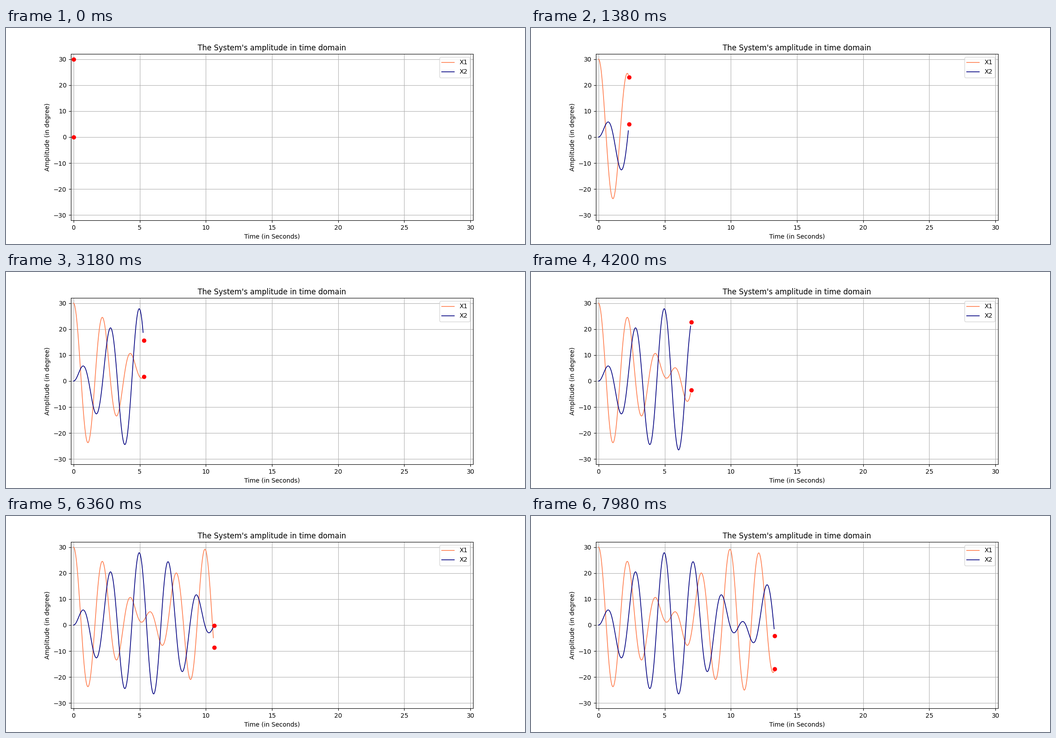
Write a matplotlib script that moves like this. It is 1159 px wide and 483 px high and loops after 8 s.

```python
import numpy as np
import matplotlib.pyplot as plt
from matplotlib.animation import FuncAnimation

WIDTH, HEIGHT, DPI = 1159, 483, 100
LOOP_MS, FRAMES = 8000, 267

# Two spring-coupled pendulums, the first released from START degrees.
START = 30
SWING_SQ = 9.81 / 1.5             # in-phase mode, squared angular frequency
COUPLED_SQ = SWING_SQ + 10 / 3    # out-of-phase mode
PUSH = np.degrees(1 / 3)          # constant push on the first pendulum


def mode(t, freq_sq):
    """Undamped oscillation about the rest point shifted by the push."""
    rest = PUSH / freq_sq
    return rest + (START - rest) * np.cos(np.sqrt(freq_sq) * t)


t = np.linspace(0, 30, 600)
total, diff = mode(t, SWING_SQ), mode(t, COUPLED_SQ)
curves = [(total + diff) / 2, (total - diff) / 2]

plt.rcParams["font.family"] = "DejaVu Sans"
fig, ax = plt.subplots(
    figsize=((WIDTH + 1e-6) / DPI, (HEIGHT + 1e-6) / DPI), dpi=DPI)
ax.set(xlim=(-0.2, 30.2), ylim=(-32, 32),
       xlabel="Time (in Seconds)", ylabel="Amplitude (in degree)",
       title="The System's amplitude in time domain")
ax.grid(True)

lines = [ax.plot([], [], color=color, lw=1.2, label=label)[0]
         for color, label in (("coral", "X1"), ("navy", "X2"))]
dots = [ax.plot([], [], "ro")[0] for _ in curves]
ax.legend(loc="upper right")


def update(i):
    # The traces trail the dots by one sample.
    for line, dot, y in zip(lines, dots, curves):
        line.set_data(t[:i], y[:i])
        dot.set_data([t[i]], [y[i]])
    return lines + dots


anim = FuncAnimation(fig, update, frames=FRAMES, interval=LOOP_MS / FRAMES,
                     repeat=True, repeat_delay=0)
plt.show()
```
